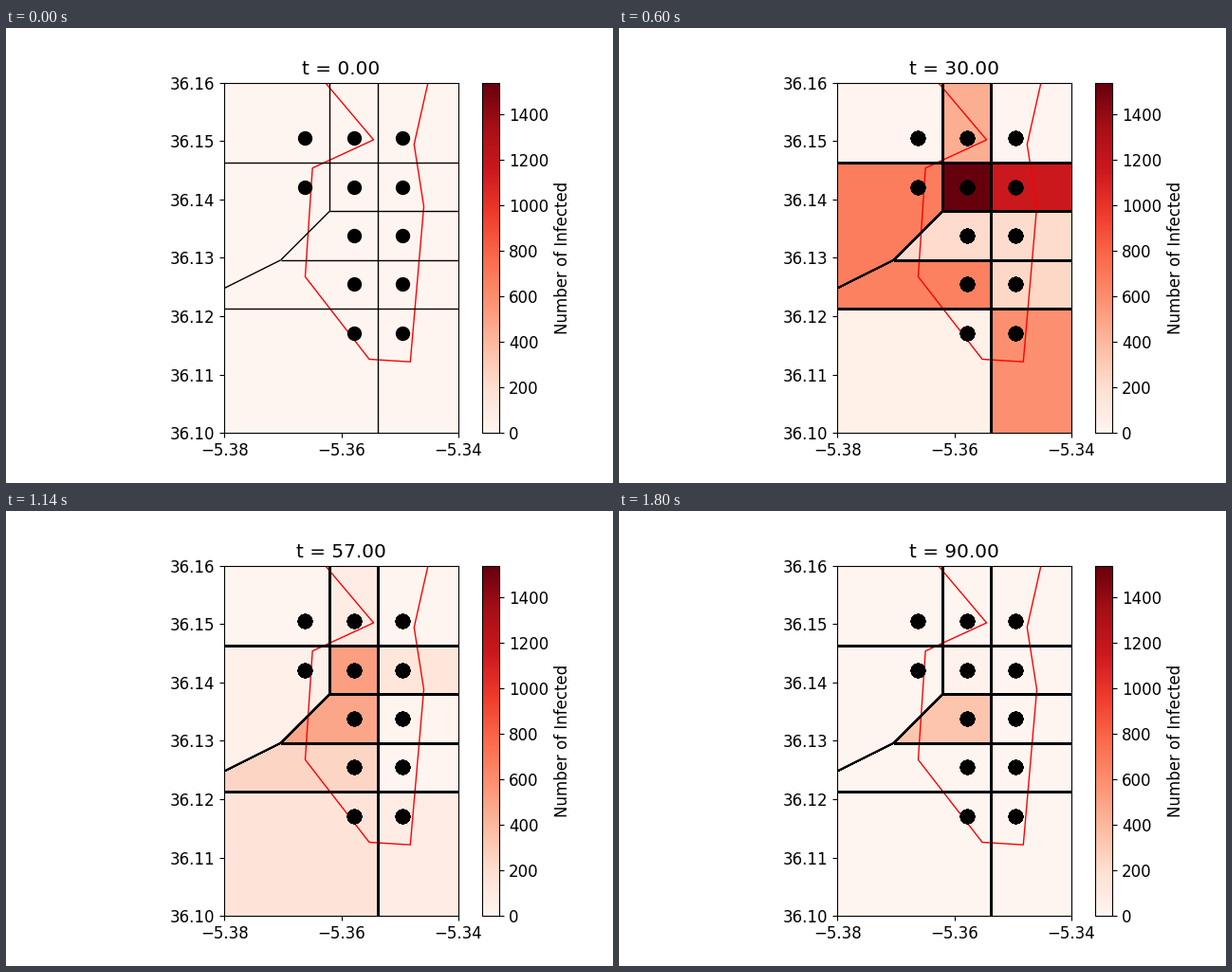
Write a matplotlib script that moves like this. It is 640 px wide and 480 px high and loops after 1820 ms.

```python
import numpy as np
import matplotlib.pyplot as plt
from matplotlib.animation import FuncAnimation
from matplotlib.collections import LineCollection, PolyCollection

plt.rcParams["font.family"] = "DejaVu Sans"
plt.rcParams["font.size"] = 12

FRAMES, INTERVAL = 91, 20
VMAX = 1541
STEP = 1 / 120  # grid spacing in degrees

# Sites on a regular grid, the left column only in the two upper rows
cols = -5.3662 + STEP * np.arange(3)
rows = 36.15045 - STEP * np.arange(5)
SITES = np.array([(x, y) for j, y in enumerate(rows)
                  for x in cols[0 if j < 2 else 1:]])

# Borders run halfway between neighbouring sites
x1, x2 = cols[:2] + STEP / 2
y1, y2, y3, y4 = rows[:4] - STEP / 2
L, R, B, T = -5.39, -5.33, 36.09, 36.17
knee = (x1 - STEP, y3)
far = (L, y3 - (knee[0] - L) / 2)


def box(xa, xb, ya, yb):
    return [(xa, ya), (xb, ya), (xb, yb), (xa, yb)]


# Cell outline with the peak, day and sharpness of its wave
CELLS = [
    (box(L, x1, y1, T), 12, 31, 5),
    (box(x1, x2, y1, T), 450, 30, 6.5),
    (box(x2, R, y1, T), 12, 31, 5),
    ([(L, y1), (x1, y1), (x1, y2), knee, far], 690, 28, 8.5),
    (box(x1, x2, y2, y1), VMAX, 31, 4.7),
    (box(x2, R, y2, y1), 1150, 30, 8.2),
    ([(x1, y2), (x2, y2), (x2, y3), knee], 520, 47, 10),
    (box(x2, R, y3, y2), 215, 29, 9),
    ([knee, (x2, y3), (x2, y4), (L, y4), far], 760, 36, 9),
    (box(x2, R, y4, y3), 385, 20, 5.2),
    (box(L, x2, B, y4), 265, 46, 20),
    (box(x2, R, B, y4), 655, 34, 13),
]
SHAPES, PEAK, DAY, SHARP = zip(*CELLS)
PEAK, DAY, SHARP = map(np.array, (PEAK, DAY, SHARP))
REST = np.where(np.arange(len(CELLS)) == 6, 320, 0)  # one cell stays infected

EDGES = [
    [(L, y1), (R, y1)], [(x1, y2), (R, y2)], [knee, (R, y3)],
    [(L, y4), (R, y4)], [(x1, T), (x1, y2)], [(x2, T), (x2, B)],
    [(x1, y2), knee], [knee, far],
]

COAST = np.array([
    (-5.36446, 36.162), (-5.35449, 36.1502), (-5.36495, 36.14537),
    (-5.36619, 36.12675), (-5.35523, 36.11262), (-5.3482, 36.11218),
    (-5.34589, 36.13878), (-5.34755, 36.14942), (-5.34472, 36.162),
])


def infected(t):
    """Gamma-shaped wave: quick rise, slower fall to the resting level."""
    x = t / DAY
    wave = (x * np.exp(1 - x)) ** SHARP
    base = np.where(x > 1, REST, 0)
    return base + (PEAK - base) * wave


fig, ax = plt.subplots(figsize=(6.4, 4.8), dpi=100)
fill = PolyCollection(SHAPES, cmap="Reds", edgecolors="none", zorder=1)
fill.set_array(infected(0))
fill.set_clim(0, VMAX)
ax.add_collection(fill)
fig.colorbar(fill, ax=ax, label="Number of Infected")

ax.plot(*COAST.T, color="red", lw=1)
lines = ax.add_collection(
    LineCollection(EDGES, colors="black", linewidths=1, zorder=2))
dots, = ax.plot(*SITES.T, "o", color="black", ms=10)

ax.set_aspect("equal")
ax.set_xlim(-5.38, -5.34)
ax.set_ylim(36.10, 36.16)
ax.set_xticks([-5.38, -5.36, -5.34])
ax.set_yticks(np.linspace(36.10, 36.16, 7))
ax.ticklabel_format(useOffset=False)
title = ax.set_title("t = 0.00")


def update(t):
    fill.set_array(infected(t))
    # Overdrawing piles up the soft edges, so strokes grow bolder
    n = min(t + 1, 30)
    lines.set_segments(EDGES * n)
    dots.set_data(*np.tile(SITES, (n, 1)).T)
    title.set_text(f"t = {t:.2f}")
    return fill, lines, dots, title


anim = FuncAnimation(fig, update, frames=FRAMES, interval=INTERVAL,
                     repeat=True, repeat_delay=0)
plt.show()
```
